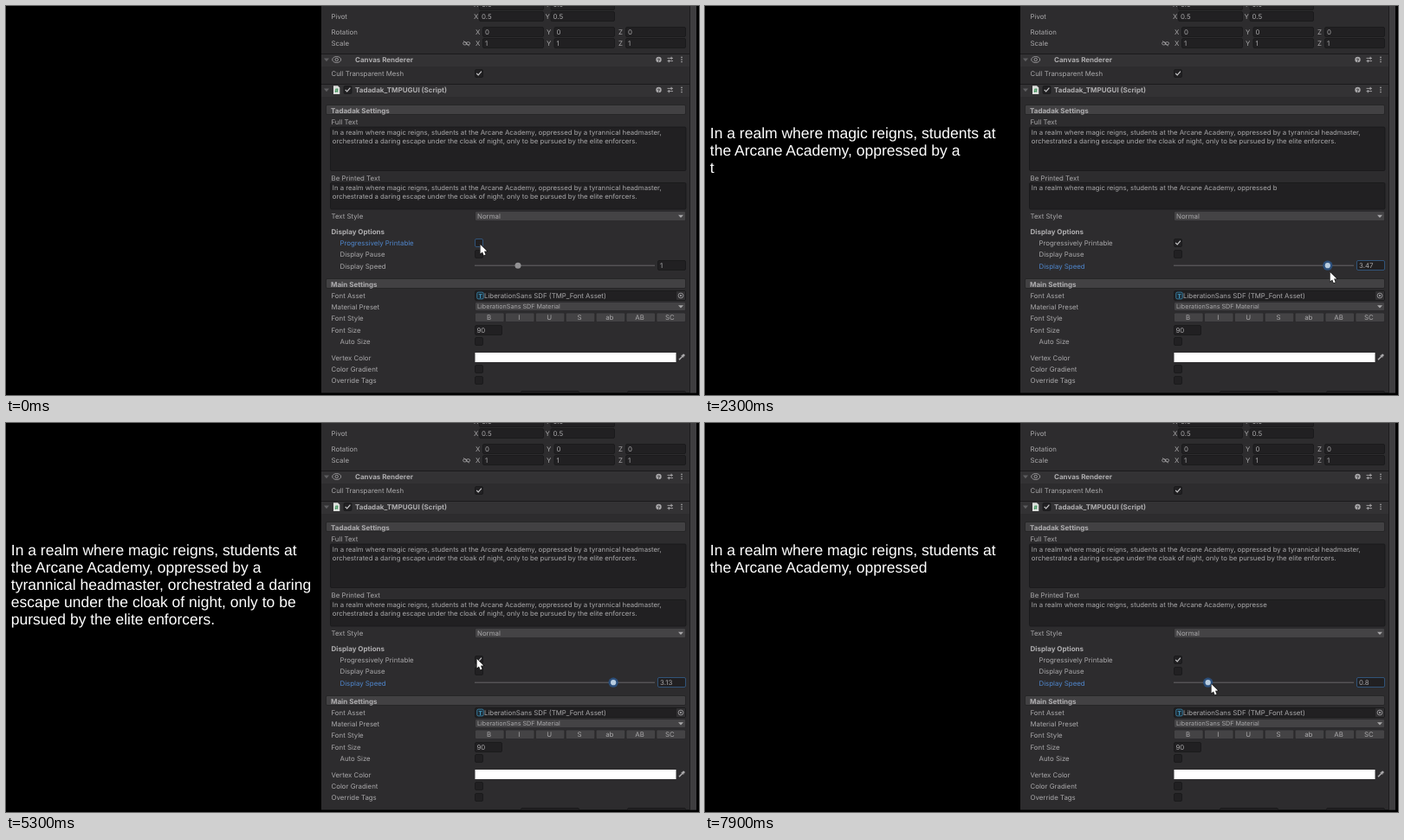
Write an HTML page with a canvas that moves like this. It is 800 px wide and 450 px high and loops after 8000 ms.

```html
<!DOCTYPE html>
<html lang="en">
<head>
<meta charset="utf-8">
<title>Inspector typing</title>
<style>
html, body { margin: 0; width: 100%; height: 100%; overflow: hidden; background: #000; }
canvas { display: block; }
</style>
</head>
<body>
<canvas id="stage" width="800" height="450"></canvas>
<script>
const ctx = document.getElementById('stage').getContext('2d');
const LOOP = 8000, STEP = 100, REPAINT = 152.2;
const INK = '#a9a8aa', BLUE = '#4f86cc', FIELD = '#212022', EDGE = '#19181a', BUTTON = '#444345';
const FOCUS = '#34608f';

const gameLines = [
  'In a realm where magic reigns, students at ',
  'the Arcane Academy, oppressed by a ',
  'tyrannical headmaster, orchestrated a daring ',
  'escape under the cloak of night, only to be ',
  'pursued by the elite enforcers.'
];
const story = gameLines.join('');
const cut = story.indexOf('orchestrated');
const panelLines = [story.slice(0, cut), story.slice(cut)];

// Keyframes: time, then one or two values
const typedKeys = [[100, 0], [900, 14], [1600, 39.3], [2700, 103], [3100, 129.5], [4150, 198],
  [5999, 198], [6000, 0], [6020, 0], [6400, 21.4], [6750, 41], [7200, 58.5], [7500, 65], [7900, 72.4]];
const speedKeys = [[0, 1], [800, 1], [1600, 2.73], [2600, 3.79], [3600, 3.79], [4300, 3.41],
  [4600, 3.13], [6700, 3.13], [7200, 1.2], [7500, 0.95], [7900, 0.8]];
const cursorKeys = [[0, 547, 276], [200, 547, 276], [700, 594, 300], [800, 594, 300],
  [1600, 684, 303], [2600, 737, 310], [3600, 737, 310], [4300, 711, 312], [4600, 697, 312],
  [4700, 697, 312], [5200, 543, 273], [6000, 543, 273], [6300, 705, 299], [6700, 705, 299],
  [7200, 604, 302], [7500, 592, 302], [7900, 584, 302]];

function at(keys, t) {
  const i = keys.findIndex(k => k[0] > t);
  if (i === 0) return keys[0].slice(1);
  if (i < 0) return keys[keys.length - 1].slice(1);
  const a = keys[i - 1], b = keys[i], p = (t - a[0]) / (b[0] - a[0]);
  return a.slice(1).map((v, j) => v + (b[j + 1] - v) * p);
}
const isOn = t => (t >= 100 && t < 5500) || t >= 6000;
const typed = t => Math.floor(at(typedKeys, t)[0]);

function rect(x, y, w, h, fill) {
  ctx.fillStyle = fill;
  ctx.fillRect(x, y, w, h);
}
function box(x, y, w, h, fill = FIELD, edge = EDGE) {
  ctx.beginPath();
  ctx.roundRect(x + 0.5, y + 0.5, w - 1, h - 1, 1.5);
  ctx.fillStyle = fill;
  ctx.fill();
  ctx.strokeStyle = edge;
  ctx.lineWidth = 0.8;
  ctx.stroke();
}
function text(s, x, y, { color = INK, size = 7.85, weight = 400, align = 'left' } = {}) {
  ctx.font = `${weight} ${size}px Inter, sans-serif`;
  ctx.fillStyle = color;
  ctx.textAlign = align;
  ctx.fillText(s, x, y + 2.8);
}
const bold = (s, x, y) => text(s, x, y, { size: 8, weight: 700, color: '#aeadaf' });

function line(points, color = INK, width = 1) {
  ctx.beginPath();
  points.forEach(p => ctx.lineTo(...p));
  ctx.strokeStyle = color;
  ctx.lineWidth = width;
  ctx.stroke();
}
function shape(points, fill) {
  ctx.beginPath();
  points.forEach(p => ctx.lineTo(...p));
  ctx.closePath();
  ctx.fillStyle = fill;
  ctx.fill();
}
function disc(x, y, r, fill) {
  ctx.beginPath();
  ctx.arc(x, y, r, 0, 7);
  ctx.fillStyle = fill;
  ctx.fill();
}
function ring(x, y, rx, ry = rx, width = 0.8) {
  ctx.beginPath();
  ctx.ellipse(x, y, rx, ry, 0, 0, 7);
  ctx.strokeStyle = INK;
  ctx.lineWidth = width;
  ctx.stroke();
}
function checkbox(x, y, on, edge) {
  box(x - 5, y - 5, 10, 10, FIELD, edge);
  if (on) line([[x - 2.8, y - 0.2], [x - 0.8, y + 1.8], [x + 2.9, y - 2.3]], '#c8c7c9', 1.2);
}
function paragraph(lines, count, x, y, gap, draw) {
  lines.forEach((s, i) => {
    if (count > 0) draw(s.slice(0, count), x, y + i * gap);
    count -= s.length;
  });
}
function numberRow(y, cells) {
  for (const [axis, ax, fx, end, value] of cells) {
    text(axis, ax, y);
    box(fx, Math.round(y - 6), end - fx, 12);
    text(value, fx + 3, y);
  }
}
function dropdown(y, h, label, size) {
  box(541, y - h / 2, 244, h, BUTTON, '#2a292b');
  text(label, 544, y - 0.2, { size });
  shape([[776, y - 1.2], [782, y - 1.2], [779, y + 2]], INK);
}
function section(y, label) {
  box(369, y - 7, 416, 12, '#424143', '#232224');
  bold(label, 375, y);
}
function component(y, label) {
  rect(364, y - 7, 425, 15, '#333234');
  rect(364, y - 7, 425, 1, '#1b1a1c');
  shape([[367, y - 1.6], [373, y - 1.6], [370, y + 2.2]], '#5f5e61');
  bold(label, 403, y + 0.2);
  disc(753.5, y, 3.2, INK);
  text('?', 753.5, y, { color: '#333234', size: 6, weight: 700, align: 'center' });
  for (const [dy, dx] of [[-1.6, 1.4], [1.6, -1.4]]) {
    line([[763.5, y + dy], [770, y + dy]], INK, 0.9);
    line([[766.7 + dx, y + dy - 1.6], [766.7 + dx, y + dy + 1.6]], INK, 1.1);
  }
  for (const d of [-2.6, 0, 2.6]) disc(780, y + d, 0.8, INK);
}

function drawTransform() {
  for (const y of [-1.5, 11.7])
    numberRow(y, [['X', 540, 546, 621, '0.5'], ['Y', 622.5, 628.5, 703, '0.5']]);
  text('Pivot', 375.5, 11.7);
  [['Rotation', 30.2, '0'], ['Scale', 43.3, '1']].forEach(([name, y, v]) => {
    text(name, 375.5, y);
    numberRow(y, [['X', 542, 550, 621, v], ['Y', 624, 632.5, 703, v], ['Z', 707, 715, 785, v]]);
  });
  ring(529.7, 43.3, 2.1, 1.7);
  ring(533.5, 43.3, 2.1, 1.7);
  line([[528, 40.3], [535, 46.3]], INK, 0.7);
}

function drawHeaders() {
  component(62, 'Canvas Renderer');
  ring(381.7, 62, 5, 3.5);
  ring(381.7, 62, 1.7);
  text('Cull Transparent Mesh', 375.5, 78.2);
  checkbox(546, 78, true);
  component(97, 'Tadadak_TMPUGUI (Script)');
  shape([[378, 92.3], [383, 92.3], [385.3, 94.6], [385.3, 102], [378, 102]], '#dcdfdc');
  text('#', 381.7, 97.6, { color: '#2c8a4b', size: 6.5, weight: 700, align: 'center' });
  checkbox(394.5, 97, true);
}

function drawMainSettings() {
  section(322, 'Main Settings');
  text('Font Asset', 375.5, 335.2);
  box(541, 329, 244, 12);
  box(543.3, 330.6, 8.4, 8.8, '#1c2a33', '#3d8fb8');
  text('T', 547.6, 335.1, { color: '#4aa6d2', size: 6.5, weight: 700, align: 'center' });
  text('LiberationSans SDF (TMP_Font Asset)', 552, 335);
  rect(774, 330, 10, 10, '#313032');
  ring(779, 335, 2.9);
  disc(779, 335, 1.1, INK);
  text('Material Preset', 375.5, 348.4);
  dropdown(347.5, 11, 'LiberationSans SDF Material', 7.2);
  text('Font Style', 375.5, 360.7);
  ['B', 'I', 'U', 'S', 'ab', 'AB', 'SC'].forEach((s, i) => {
    box(541 + i * 34.9, 354.5, 34.6, 11.5, BUTTON, '#2a292b');
    text(s, 557.6 + i * 34.8, 360.3, { align: 'center' });
  });
  text('Font Size', 375.5, 375.4);
  box(541, 369, 32, 12);
  text('90', 543.5, 375.3);
  text('Auto Size', 385.5, 388.4);
  text('Vertex Color', 375.5, 407);
  rect(541.5, 401, 232, 11, '#fff');
  line([[777, 409.3], [781, 405.2]], INK, 1.5);
  line([[779.7, 403.8], [782.3, 406.4]], INK, 1.2);
  disc(782.2, 404, 1.5, INK);
  text('Color Gradient', 375.5, 420.4);
  text('Override Tags', 375.5, 433.4);
  for (const y of [388, 420, 433]) checkbox(546, y, false);
  box(594, 445, 68, 12);
  box(717, 445, 68, 12);
}

function drawSlider(speed, focused) {
  const x = 539.3 + 51.7 * speed;
  text('Display Speed', 385.5, 300.7, { color: focused ? BLUE : INK });
  rect(541, 299.6, 208, 1.3, '#5a595b');
  if (focused) disc(x, 300.2, 5.6, '#2c4f7b');
  disc(x, 300.2, focused ? 3.1 : 3.5, focused ? '#b9cde0' : '#939294');
  box(752, 294, 33, 12, FIELD, focused ? FOCUS : EDGE);
  text(String(+speed.toFixed(2)), 755, 300.4);
}

function drawCursor([x, y]) {
  const tip = [[0, 0], [0, 10.6], [2.4, 8.5], [4, 12.4], [6, 11.5], [4.4, 7.7], [7.6, 7.5]]
    .map(([dx, dy]) => [x + dx + 0.6, y + dy]);
  line([...tip, tip[0]], '#111', 1.2);
  shape(tip, '#fff');
}

function draw(t) {
  const on = isOn(t), onSlider = (t >= 800 && t < 5400) || t >= 6700;
  const seen = 1600 + Math.floor((t - 1600) / REPAINT) * REPAINT;
  const panelCount = on && isOn(seen) ? typed(seen) : on ? 0 : story.length;
  const drawText = (s, x, y) => text(s, x, y, { size: 7.75 });

  ctx.textRendering = 'geometricPrecision';
  rect(0, 0, 800, 450, '#000');
  ctx.textAlign = 'left';
  ctx.font = '17.5px "Liberation Sans", Arial, sans-serif';
  ctx.fillStyle = '#fff';
  paragraph(gameLines, on ? typed(t) : 0, 5.8, 153.1, 19.97, (s, x, y) => ctx.fillText(s, x, y));

  ctx.save();
  ctx.beginPath();
  ctx.rect(364, 0, 433, 447.5);
  ctx.clip();
  rect(364, 0, 433, 448, '#2d2c2e');
  rect(789, 0, 1, 448, '#1d1c1e');
  rect(790, 0, 7, 448, '#3f3e40');

  drawTransform();
  drawHeaders();
  section(121, 'Tadadak Settings');
  text('Full Text', 375.5, 134.3);
  box(374, 139.5, 411.5, 51.5);
  paragraph(panelLines, story.length, 376.8, 145.9, 9.9, drawText);
  text('Be Printed Text', 375.5, 198.8);
  box(374, 204, 411.5, 31.5);
  paragraph(panelLines, panelCount, 376.8, 210.6, 9.9, drawText);
  text('Text Style', 375.5, 243.5);
  dropdown(243, 12, 'Normal');
  bold('Display Options', 375.5, 261.4);
  text('Progressively Printable', 385.5, 274.4, { color: onSlider ? INK : BLUE });
  checkbox(546, 274, on, onSlider ? EDGE : FOCUS);
  text('Display Pause', 385.5, 287.6);
  checkbox(546, 287, false);
  drawSlider(at(speedKeys, t)[0], onSlider);
  drawMainSettings();
  drawCursor(at(cursorKeys, t));
  ctx.restore();
}

const start = performance.now();
function tick() {
  const t = (performance.now() - start) % LOOP;
  draw(Math.floor(t / STEP) * STEP);
  requestAnimationFrame(tick);
}
tick();
</script>
</body>
</html>
```
